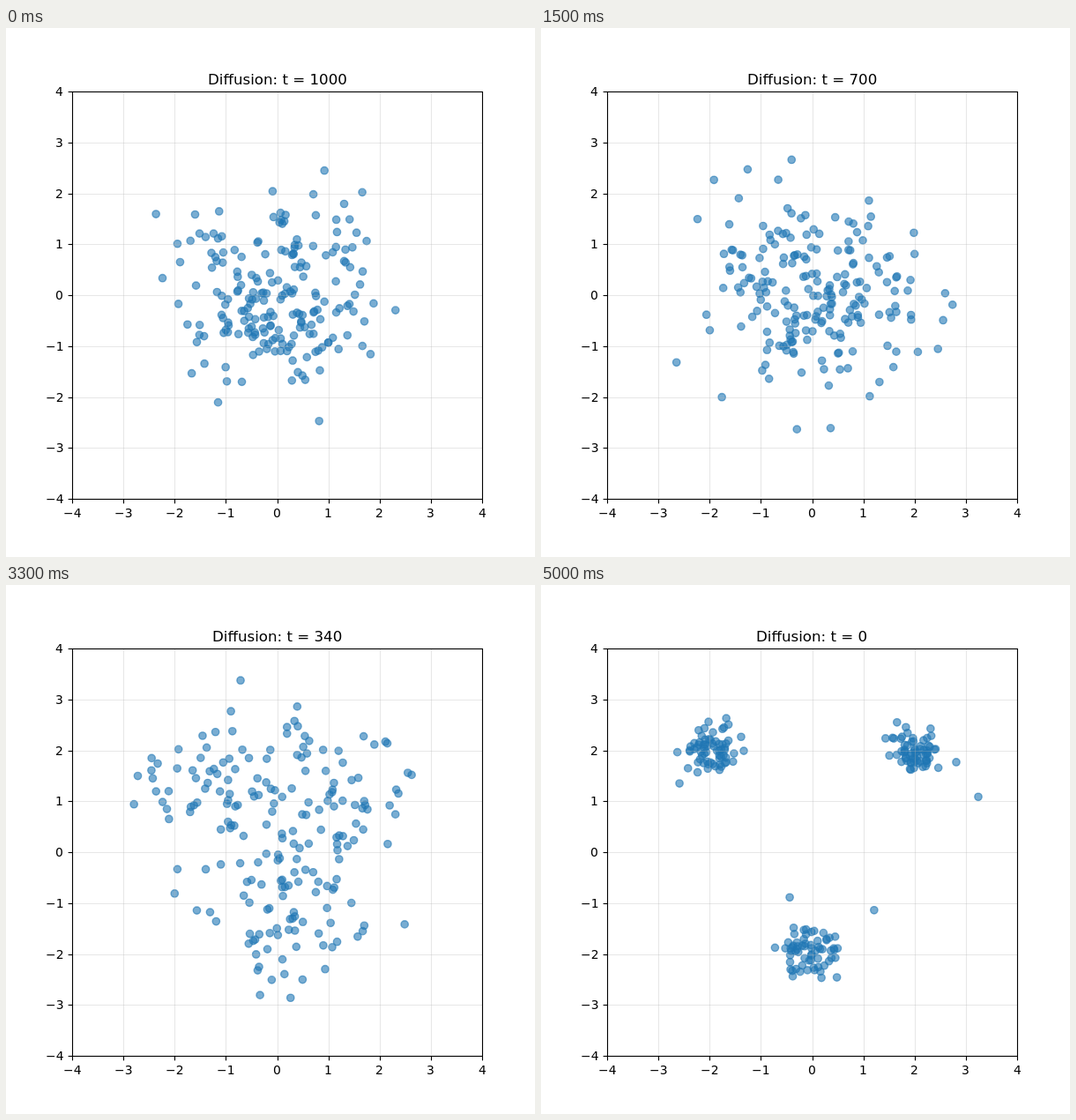
Recreate the animation shown at these times as an HTML page with a canvas. Size 600x600 px, loop 5100 ms.

```html
<!DOCTYPE html>
<html lang="en">
<head>
<meta charset="utf-8">
<title>Diffusion</title>
<style>
  html, body { margin: 0; width: 100%; height: 100%; overflow: hidden; background: #fff; }
  canvas { display: block; }
</style>
</head>
<body>
<canvas id="plot" width="600" height="600"></canvas>
<script>
const ctx = document.getElementById('plot').getContext('2d');
const POINTS = 200, STEPS = 50, STEP_MS = 100, STEP_T = 20;
const BOX = { left: 75, top: 72, right: 540, bottom: 534 };
const CENTERS = [[-2, 2], [2, 2], [0, -2]];
const NOISE = .95;

let seed = 11;
function random() {
  seed = (seed + 0x6D2B79F5) | 0;
  let n = Math.imul(seed ^ (seed >>> 15), seed | 1);
  n ^= n + Math.imul(n ^ (n >>> 7), n | 61);
  return ((n ^ (n >>> 14)) >>> 0) / 4294967296;
}
const normal = () => Math.sqrt(-2 * Math.log(1 - random())) * Math.cos(2 * Math.PI * random());

// Share of the signal left after k steps of a linear noise schedule
function signal(k) {
  const t = k * STEP_T;
  return Math.exp(-(1e-4 * t + 9.95e-6 * t * t));
}

// Noising walk from a data value; it is played backwards
function noisingWalk(start) {
  const path = [start];
  for (let k = 1; k <= STEPS; k++) {
    const keep = signal(k) / signal(k - 1);
    path.push(path[k - 1] * Math.sqrt(keep) + Math.sqrt(1 - keep) * NOISE * normal());
  }
  return path;
}

// Three tight clusters with a few stragglers
const walks = Array.from({ length: POINTS }, (_, i) => {
  const sigma = i % 14 ? .24 : .5;
  return CENTERS[i % 3].map(center => noisingWalk(center + sigma * normal()));
});

const px = x => BOX.left + (x + 4) * (BOX.right - BOX.left) / 8;
const py = y => BOX.bottom - (y + 4) * (BOX.bottom - BOX.top) / 8;
const snap = v => Math.round(v) + .5;

function line(x1, y1, x2, y2) {
  ctx.beginPath();
  ctx.moveTo(x1, y1);
  ctx.lineTo(x2, y2);
  ctx.stroke();
}

// Places text on whole pixels; anchor is .5 for centred, 1 for right-aligned
function text(label, x, y, size, anchor) {
  ctx.font = size + 'px "DejaVu Sans", sans-serif';
  ctx.fillText(label, Math.round(x - anchor * ctx.measureText(label).width), Math.round(y));
}

function drawPoints(k) {
  ctx.save();
  ctx.beginPath();
  ctx.rect(BOX.left, BOX.top, BOX.right - BOX.left, BOX.bottom - BOX.top);
  ctx.clip();
  ctx.globalAlpha = .6;
  ctx.fillStyle = ctx.strokeStyle = '#1f77b4';
  ctx.lineWidth = 1.39;
  for (const [xs, ys] of walks) {
    ctx.beginPath();
    ctx.arc(px(xs[k]), py(ys[k]), 4.17, 0, 2 * Math.PI);
    ctx.fill();
    ctx.stroke();
  }
  ctx.restore();
}

function drawAxes() {
  const { left, top, right, bottom } = BOX;
  ctx.lineWidth = 1.11;
  ctx.fillStyle = '#000';
  for (let v = -4; v <= 4; v++) {
    const x = snap(px(v)), y = snap(py(v));
    const label = String(v).replace('-', '\u2212');
    ctx.strokeStyle = 'rgba(176,176,176,.3)';
    line(x, top, x, bottom);
    line(left, y, right, y);
    ctx.strokeStyle = '#000';
    line(x, bottom + .5, x, bottom + 5.4);
    line(left + .5, y, left - 4.4, y);
    text(label, px(v), 555, 13.89, .5);
    text(label, 65.3, py(v) + 5.2, 13.89, 1);
  }
  ctx.strokeRect(left + .5, top + .5, right - left, bottom - top);
}

function draw(now) {
  const k = STEPS - Math.floor(Math.max(0, now) / STEP_MS) % (STEPS + 1);
  ctx.fillStyle = '#fff';
  ctx.fillRect(0, 0, 600, 600);
  drawPoints(k);
  drawAxes();
  text('Diffusion: t = ' + k * STEP_T, 307.5, 64, 16.67, .5);
  requestAnimationFrame(draw);
}
draw(performance.now());
</script>
</body>
</html>
```
